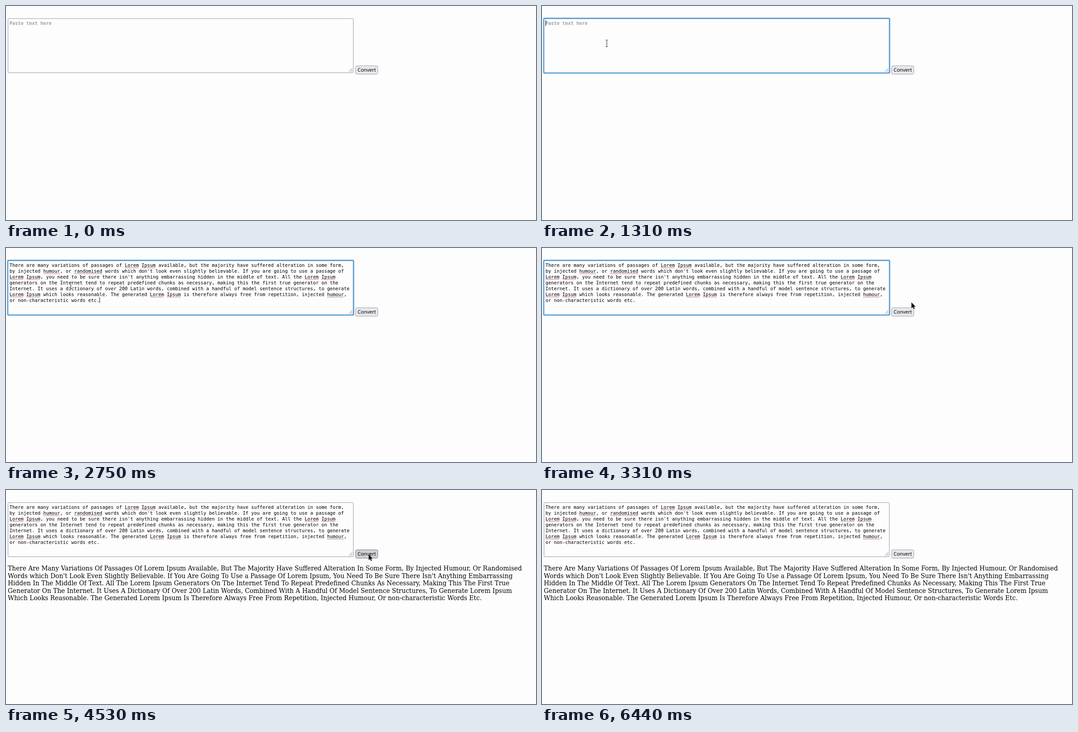
An HTML page for the animation above (6.62 s loop, 1178x476 px).

```html
<!DOCTYPE html>
<html lang="en">
<head>
<meta charset="utf-8">
<title>Title case converter</title>
<style>
  html, body { margin: 0; width: 100%; height: 100%; overflow: hidden; background: #fdfdfd; }
  svg { display: block; width: 1178px; height: 476px; }
  .mono { font: 10.38px "DejaVu Sans Mono", monospace; }
  .serif { font: 13.84px "DejaVu Serif", serif; }
  .label { font: 11px "Noto Sans", sans-serif; }
</style>
</head>
<body>
<svg id="stage" viewBox="0 0 1178 476" xmlns="http://www.w3.org/2000/svg">
  <rect width="1178" height="476" fill="#fdfdfd"/>
  <rect id="box" x="4.5" y="28" width="767.5" height="120.5" rx="1.5" fill="#fdfdfd" stroke-width=".9"/>
  <g id="ring" fill="none">
    <rect x="2.4" y="25.9" width="771.7" height="124.7" rx="3" stroke="#c3e0f3" stroke-width="1.5"/>
    <rect x="4.1" y="27.6" width="768.3" height="121.3" rx="2" stroke="#2f86c9" stroke-width="1.7"/>
  </g>
  <path d="M761.8 146.5l8-8.5M765 146.5l5-5.2M768 146.5l2-2" stroke="#74747c" stroke-width=".8"/>
  <text id="hint" class="mono" x="7.8" y="41.6" fill="#757575">Paste text here</text>
  <g id="typed" class="mono"></g>
  <path id="marks" fill="none" stroke="#b0436f" stroke-width=".8"/>
  <rect id="caret" y="31.6" width="1" height="12.8" fill="#000"/>
  <rect id="button" x="777.1" y="133" width="49.3" height="18.6" rx="3.2" stroke-width=".9"/>
  <text class="label" x="781.5" y="146.3">Convert</text>
  <g id="result" class="serif"></g>
  <g id="arrow">
    <path d="M0 0V13L3 10.3L5 14.8L7.3 13.8L5.3 9.4H9.4Z" fill="#111" stroke="#fff" stroke-width="1" paint-order="stroke"/>
  </g>
  <g id="beam" fill="none">
    <path d="M-2.6-7.2H-.8L0-6.6L.8-7.2H2.6M0-6.6V6.9M-2.6 7.5H-.8L0 6.9L.8 7.5H2.6" stroke="#fff" stroke-width="2.4"/>
    <path d="M-2.6-7.2H-.8L0-6.6L.8-7.2H2.6M0-6.6V6.9M-2.6 7.5H-.8L0 6.9L.8 7.5H2.6" stroke="#222" stroke-width="1"/>
  </g>
</svg>
<script>
const LOOP = 6620;
const FOCUS = 1000, PASTE = 2190, SPELL = 2250, PRESS = 3980, RELEASE = 4130;
const CHAR = 6.248, LEFT = 7.8;

const plain = [
  "There are many variations of passages of Lorem Ipsum available, but the majority have suffered alteration in some form,",
  "by injected humour, or randomised words which don't look even slightly believable. If you are going to use a passage of",
  "Lorem Ipsum, you need to be sure there isn't anything embarrassing hidden in the middle of text. All the Lorem Ipsum",
  "generators on the Internet tend to repeat predefined chunks as necessary, making this the first true generator on the",
  "Internet. It uses a dictionary of over 200 Latin words, combined with a handful of model sentence structures, to generate",
  "Lorem Ipsum which looks reasonable. The generated Lorem Ipsum is therefore always free from repetition, injected humour,",
  "or non-characteristic words etc."
];
const titled = [
  "There Are Many Variations Of Passages Of Lorem Ipsum Available, But The Majority Have Suffered Alteration In Some Form, By Injected Humour, Or Randomised",
  "Words which Don't Look Even Slightly Believable. If You Are Going To Use a Passage Of Lorem Ipsum, You Need To Be Sure There Isn't Anything Embarrassing",
  "Hidden In The Middle Of Text. All The Lorem Ipsum Generators On The Internet Tend To Repeat Predefined Chunks As Necessary, Making This The First True",
  "Generator On The Internet. It Uses A Dictionary Of Over 200 Latin Words, Combined With A Handful Of Model Sentence Structures, To Generate Lorem Ipsum",
  "Which Looks Reasonable. The Generated Lorem Ipsum Is Therefore Always Free From Repetition, Injected Humour, Or non-characteristic Words Etc."
];

// Pointer strokes as [time, x, y]; each stroke is shown only within its own span.
const strokes = [
  [[190, -8, 282], [330, 22, 250], [500, 78, 178], [680, 130, 104], [840, 144, 83],
   [2850, 144, 83], [2960, 220, 84], [3080, 470, 91], [3200, 725, 108], [3310, 821, 121],
   [3400, 829, 127], [3530, 824, 133], [3690, 810, 142], [3800, 806, 143],
   [5340, 806, 143], [5460, 784, 190], [5620, 715, 350], [5780, 650, 490]]
];

const $ = id => document.getElementById(id);
const show = (id, on) => $(id).setAttribute("visibility", on ? "visible" : "hidden");
const paint = (id, attrs) => {
  for (const k in attrs) $(id).setAttribute(k, attrs[k]);
};

function addLines(id, lines, x, y, step) {
  lines.forEach((line, i) => {
    const el = document.createElementNS("http://www.w3.org/2000/svg", "text");
    el.setAttribute("x", x);
    el.setAttribute("y", y + i * step);
    el.textContent = line;
    $(id).append(el);
  });
}

function squiggles() {
  let d = "";
  plain.forEach((line, row) => {
    for (const m of line.matchAll(/Lorem|Ipsum|humour|randomised/g)) {
      const x = LEFT + m.index * CHAR, end = x + m[0].length * CHAR;
      const y = 43.6 + row * 13;
      d += `M${x} ${y}`;
      for (let px = x + 1.6, k = 1; px <= end; px += 1.6, k++) d += `L${px} ${y + (k % 2)}`;
    }
  });
  return d;
}

function pointer(t) {
  for (const keys of strokes) {
    for (let i = 1; i < keys.length; i++) {
      const [t0, x0, y0] = keys[i - 1], [t1, x1, y1] = keys[i];
      if (t >= t0 && t < t1) {
        const f = (t - t0) / (t1 - t0);
        return [x0 + (x1 - x0) * f, y0 + (y1 - y0) * f];
      }
    }
  }
  return null;
}

const inside = (p, x0, y0, x1, y1) => p && p[0] >= x0 && p[0] <= x1 && p[1] >= y0 && p[1] <= y1;

function render(t) {
  const p = pointer(t);
  const focused = t >= FOCUS && t < PRESS;
  const pasted = t >= PASTE, done = t >= RELEASE;
  const overBox = inside(p, 4, 27, 772, 149);
  const overButton = inside(p, 777, 132, 827, 152);
  const overText = done && inside(p, 4, 166, 1174, 249);

  paint("box", { stroke: overBox ? "#676774" : "#8a8a9c" });
  show("ring", focused);
  show("hint", !pasted);
  show("typed", pasted);
  show("marks", t >= SPELL);
  show("result", done);

  paint("caret", pasted ? { x: 207.6, y: 109.4 } : { x: 7.7, y: 31.6 });
  show("caret", focused && !(t >= 2900 && t < 3600));

  const [fill, stroke] = t >= PRESS && t < RELEASE ? ["#b1b1b9", "#484851"]
    : overButton ? ["#d0d0d7", "#676774"] : ["#e9e9ed", "#8f8f9d"];
  paint("button", { fill, stroke });

  const beam = overBox || overText;
  show("beam", p && beam);
  show("arrow", p && !beam);
  if (p) paint(beam ? "beam" : "arrow", { transform: `translate(${p[0]} ${p[1]})` });
}

addLines("typed", plain, LEFT, 41.6, 13);
addLines("result", titled, 4, 179, 16.5);
$("marks").setAttribute("d", squiggles());

const start = performance.now();
function tick() {
  render((performance.now() - start) % LOOP);
  requestAnimationFrame(tick);
}
tick();
</script>
</body>
</html>
```
